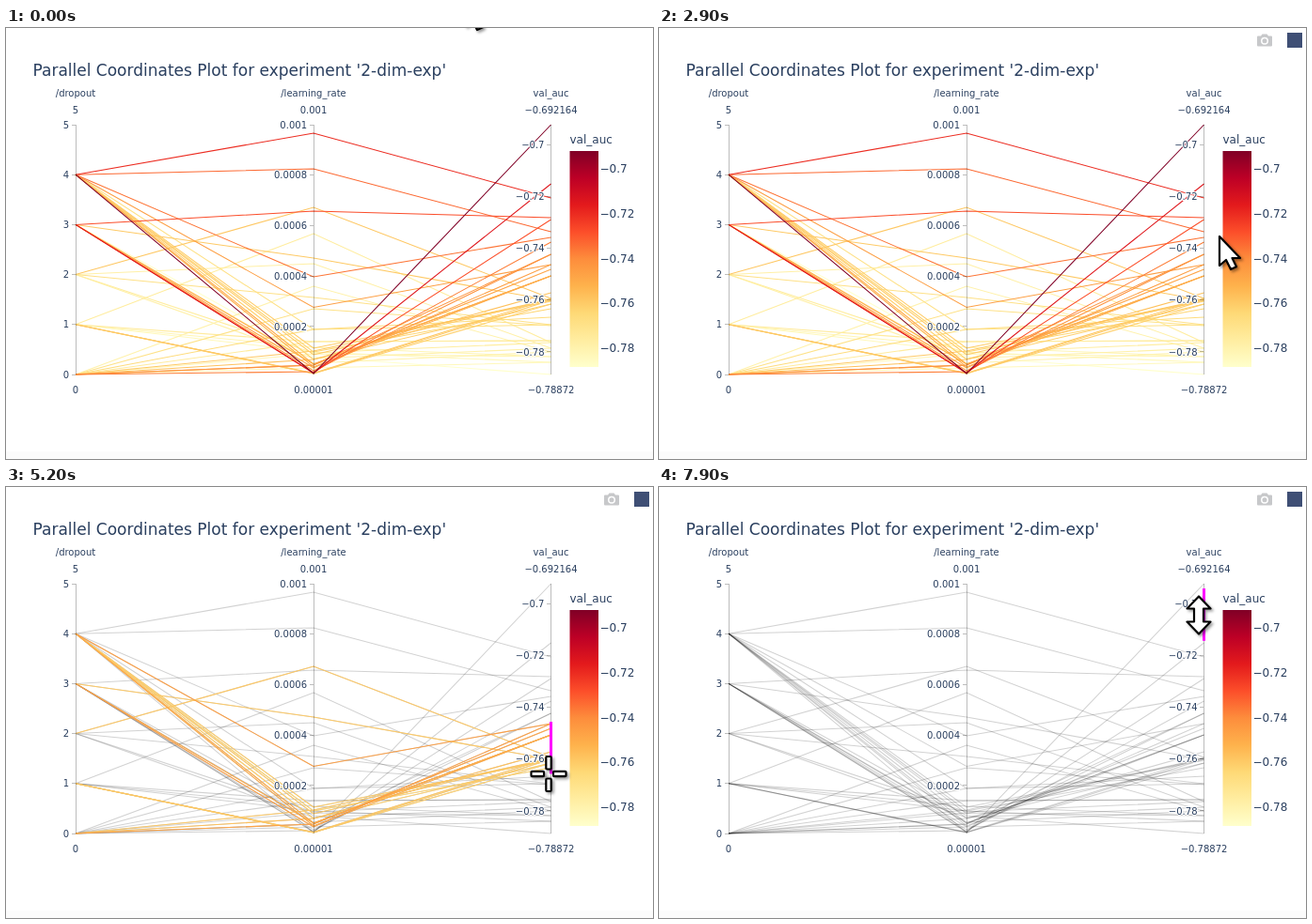
An HTML page for the animation above (8 s loop, 688 px wide and 459 px high).

```html
<!DOCTYPE html>
<html lang="en">
<head>
<meta charset="utf-8">
<title>Parallel coordinates</title>
<style>
  html, body { margin: 0; width: 100%; height: 100%; overflow: hidden; background: #fff; }
  svg { display: block; width: 688px; height: 459px; }
  text { font-family: "DejaVu Sans", sans-serif; font-size: 10px; fill: #2a3f5f; white-space: pre; }
  .big { font-size: 17px; }
  .mid { font-size: 12px; }
  .halo { paint-order: stroke; stroke: #fff; stroke-width: 2px; stroke-linejoin: round; }
  .lines path { fill: none; stroke-width: 1.05; }
  .cursor { fill: #fff; stroke: #000; stroke-width: 2.2; stroke-linejoin: round;
            filter: drop-shadow(2px 2px 1.5px rgba(0, 0, 0, .4)); }
</style>
</head>
<body>
<svg id="stage" viewBox="0 0 688 459">
  <defs><linearGradient id="scale" x1="0" y1="1" x2="0" y2="0"></linearGradient></defs>
  <rect width="688" height="459" fill="#fff"/>
  <rect y="451" width="688" height="8" fill="#fbfbfb"/>
  <g id="context" class="lines" stroke="#000" stroke-opacity=".18"></g>
  <g id="focus" class="lines"></g>
  <g id="axes"></g>
  <rect id="brush" x="578" width="3" fill="#f0f"/>
  <g id="labels"></g>
  <rect x="599.5" y="131" width="30.5" height="230" fill="url(#scale)"/>
  <g id="bar">
    <path fill="#c7c8ca" fill-rule="evenodd" d="M637 8.5H640L641.5 6.5H646.5L648 8.5H651Q652 8.5 652 9.5V18.5Q652 19.5 651 19.5H637Q636 19.5 636 18.5V9.5Q636 8.5 637 8.5ZM640 13.7a4 4 0 1 0 8 0a4 4 0 1 0 -8 0Z"/>
    <circle cx="644" cy="13.7" r="2.5" fill="#c7c8ca"/>
    <rect x="668" y="5" width="16" height="16" fill="#3f4f75"/>
  </g>
  <g class="cursor">
    <path id="arrow" d="M0 0V31L7 25L12 35L18 32.3L13.5 23H22Z"/>
    <g id="cross">
      <rect x="-18.5" y="-2.7" width="13.5" height="5.4" rx="1"/>
      <rect x="5" y="-2.7" width="13.5" height="5.4" rx="1"/>
      <rect x="-2.7" y="-18.5" width="5.4" height="13.5" rx="1"/>
      <rect x="-2.7" y="5" width="5.4" height="13.5" rx="1"/>
    </g>
    <path id="resize" d="M0 -20L12.5 -7H5V7H12.5L0 20L-12.5 7H-5V-7H-12.5Z"/>
  </g>
</svg>
<script>
const LOOP = 8000, STEP = 100;
const TOP = 103, BOTTOM = 369, H = BOTTOM - TOP;
const X = [74, 327, 579.5];
const $ = id => document.getElementById(id);

function add(parent, tag, attrs, text) {
  const el = document.createElementNS('http://www.w3.org/2000/svg', tag);
  for (const k in attrs) el.setAttribute(k, attrs[k]);
  if (text) el.textContent = text;
  parent.appendChild(el);
  return el;
}

// YlOrRd colour scale
const ramp = ['#ffffcc', '#ffeda0', '#fed976', '#feb24c', '#fd8d3c', '#fc4e2a', '#e31a1c', '#bd0026', '#800026'];
const rgb = hex => [1, 3, 5].map(i => parseInt(hex.slice(i, i + 2), 16));
ramp.forEach((c, i) => add($('scale'), 'stop', { offset: i / 8, 'stop-color': c }));
function colour(y) {
  const f = (BOTTOM - y) / H * 8, i = Math.min(7, Math.floor(f));
  const a = rgb(ramp[i]), b = rgb(ramp[i + 1]);
  return `rgb(${a.map((v, k) => Math.round(v + (b[k] - v) * (f - i)))})`;
}

// dropout value, height on the middle axis, height on the right axis
const trials = [
  [4, 112, 181], [4, 150, 217], [3, 195, 202], [4, 265, 223], [4, 297.5, 252],
  [2, 191, 288], [3, 245, 290], [2, 251, 341], [1, 219, 335], [0, 275, 345],
  [2, 287, 316], [0, 299, 317], [0, 321, 308], [4, 321, 316], [1, 334, 333],
  [1, 340, 350], [1, 345, 356], [2, 346, 335], [2, 352, 341], [0, 334, 333],
  [0, 347, 350], [0, 362, 356], [3, 350, 369], [3, 357, 345], [1, 368, 290],
  [1, 368, 294], [1, 367.5, 288], [4, 341, 291], [4, 348, 289], [4, 353, 294],
  [4, 345, 299], [0, 344, 289], [0, 353, 282], [0, 359, 257], [4, 358, 264],
  [4, 361, 264], [3, 362, 252], [3, 358, 264], [0, 359, 241], [3, 365, 241],
  [0, 366, 228], [3, 367, 204], [3, 367.5, 166], [4, 368, 103]
].sort((a, b) => b[2] - a[2]);

const focus = trials.map(([d, y1, y2]) => {
  const path = `M${X[0]} ${BOTTOM - d * H / 5}L${X[1]} ${y1}L${X[2]} ${y2}`;
  add($('context'), 'path', { d: path });
  return { y: y2, el: add($('focus'), 'path', { d: path, stroke: colour(y2) }) };
});

function axis(i, name, first, last, ticks, minus) {
  const x = X[i], edge = Math.floor(x), [lo, hi] = [Number(first), Number(last)];
  const line = { stroke: '#000', 'stroke-opacity': .26, fill: 'none' };
  const label = (px, py, s, anchor) =>
    add($('labels'), 'text', { x: px, y: py, 'text-anchor': anchor, class: 'halo' }, s.replace('-', '\u2212'));
  add($('axes'), 'path', { ...line, d: `M${edge + .5} ${TOP}V${BOTTOM}` });
  label(x, 73, name, 'middle');
  label(x, 91, last, 'middle');
  label(x, 389, first, 'middle');
  for (const s of ticks) {
    const y = BOTTOM - (s - lo) / (hi - lo) * H;
    add($('axes'), 'path', { ...line, d: `M${edge - 4} ${Math.floor(y) + .5}H${edge}` });
    label(x - 7, y + 3.6, s, 'end');
  }
}
axis(0, '/dropout', '0', '5', ['0', '1', '2', '3', '4', '5']);
axis(1, '/learning_rate', '0.00001', '0.001', ['0.0002', '0.0004', '0.0006', '0.0008', '0.001']);
axis(2, 'val_auc', '-0.78872', '-0.692164', ['-0.78', '-0.76', '-0.74', '-0.72', '-0.7']);

add($('labels'), 'text', { x: 28.5, y: 51, class: 'big' }, "Parallel Coordinates Plot for experiment '2-dim-exp'");
add($('labels'), 'text', { x: 599.5, y: 123, class: 'mid' }, 'val_auc');
for (let i = 0; i < 5; i++) {
  const v = (.7 + i * .02).toFixed(2).replace('.70', '.7');
  add($('labels'), 'text', { x: 631.5, y: 154.3 + i * 47.6, class: 'mid' }, '\u2212' + v);
}

// start, end, x, y, pointer shape
const moves = [
  [1000, 1800, 574, 254, 'arrow'],
  [1800, 1900, 575, 258, 'cross'],
  [1900, 2000, 579, 250, 'cross'],
  [2000, 2400, 604, 208, 'arrow'],
  [2800, 3000, 588, 236, 'arrow'],
  [3000, 3100, 575, 253, 'cross'],
  [3100, 3300, 583, 249.5, 'cross'],
  [3700, 3800, 582, 249.3, 'cross'],
  [4000, 4100, 579.5, 251, 'cross'],
  [4300, 4400, 581, 250, 'cross'],
  [4500, 4700, 579, 268, 'cross'],
  [4700, 5200, 577, 305.5, 'cross'],
  [5400, 5600, 592, 300, 'arrow'],
  [5600, 5700, 601, 286, 'arrow'],
  [6000, 6300, 584, 277, 'arrow'],
  [6300, 6500, 578, 278.5, 'resize'],
  [6700, 7100, 574, 214, 'resize'],
  [7200, 7900, 574, 136.5, 'resize']
];

function pointer(t) {
  let x = 489, y = -33, shape = 'arrow';
  for (const [from, to, nx, ny, kind] of moves) {
    if (t <= from) break;
    const k = Math.min(1, (t - from) / (to - from));
    const e = to - from > 400 ? k * k * (3 - 2 * k) * .6 + k * .4 : k;
    x += (nx - x) * e;
    y += (ny - y) * e;
    shape = kind;
  }
  return { x, y, shape };
}

function selection(t, y) {
  if (t < 4600) return null;
  if (t < 5300) return [250, y];
  const shift = t > 6700 ? y - 278.5 : 0;
  return [250 + shift, 305.8 + shift];
}

function draw(ms) {
  const t = Math.floor(ms / STEP) * STEP;
  const p = pointer(t), sel = selection(t, p.y);
  for (const id of ['arrow', 'cross', 'resize']) {
    $(id).setAttribute('transform', `translate(${p.x} ${p.y})`);
    $(id).style.display = id === p.shape ? '' : 'none';
  }
  $('bar').setAttribute('opacity', Math.max(0, Math.min(1, (t - 1000) / 300)));
  $('context').style.display = $('brush').style.display = sel ? '' : 'none';
  if (sel) {
    $('brush').setAttribute('y', sel[0]);
    $('brush').setAttribute('height', Math.max(0, sel[1] - sel[0]));
  }
  for (const { y, el } of focus)
    el.style.display = !sel || (y >= sel[0] && y <= sel[1]) ? '' : 'none';
}

const begin = performance.now();
function tick() {
  draw((performance.now() - begin) % LOOP);
  requestAnimationFrame(tick);
}
draw(0);
requestAnimationFrame(tick);
</script>
</body>
</html>
```
